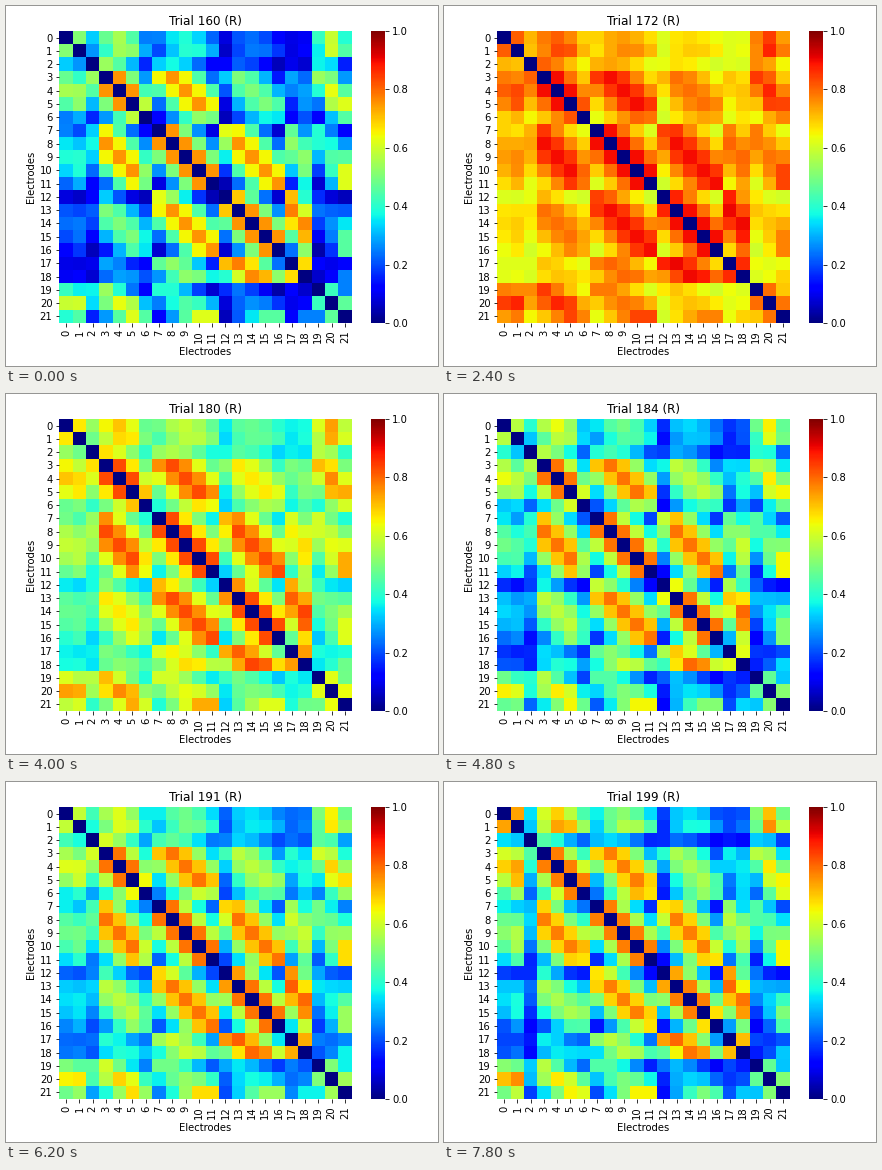
A matplotlib script that plays this animation: 432x360 px, repeating every 8 s.

```python
import numpy as np
import matplotlib.pyplot as plt
from matplotlib.animation import FuncAnimation

N = 22
W, H = 432, 360
FIRST, TRIALS, STEP = 160, 40, 200


def row(y, half):
    return [(x, y) for x in range(-half, half + 1)]


# Scalp positions, one unit between neighbouring electrodes
POS = np.array([(-.1, 1.6), (.4, 1.5), (-1, 1.7)] + row(1, 1) + [(1.3, .7)]
               + row(0, 2) + [(-2.1, -1.5)] + row(-1, 2)[1:]
               + [(-1, -1.9), (.3, -1.9), (-1.5, 1.5), (.2, 1.6), (1.5, .5)])
DIST = np.hypot(*(POS[:, None] - POS).T)

FRONT = [0, 1, 19, 20, 21]
QUALITY = np.ones(N)
QUALITY[[0, 1, 2, 6, 19]] = .65
QUALITY[[20, 21]] = .75

# trial: (spread, falloff, gains of electrodes that stand out)
STATES = {
    0: (1, .25, {}),
    7: (.98, .25, {0: .85}),
    12: (.42, .25, {1: 1.1, 19: 1.2, 20: 1.1}),
    16: (.48, .25, {19: 1.2, 20: 1.1}),
    24: (.96, .22, {0: 1.1, 12: .85, 17: .85}),
    31: (.85, .25, {}),
    39: (.93, .24, {0: 1.2, 1: 1.3, 2: .75, 6: 1.3, 16: .85}),
}


def blend(k, values):
    return np.interp(k, list(STATES), values)


def matrix(k):
    spread, falloff = (blend(k, [s[i] for s in STATES.values()])
                       for i in range(2))
    q = [QUALITY[e] * blend(k, [s[2].get(e, 1) for s in STATES.values()])
         for e in range(N)]
    # Falls off linearly with distance, softened near zero
    link = np.logaddexp(0, 8 * (1 - falloff * DIST)) / 8 * np.outer(q, q)
    link[np.ix_(FRONT, FRONT)] += .14
    m = 1 - spread * (1 - link)
    np.fill_diagonal(m, 0)
    return np.clip(m, 0, 1)


def box(x, y, w, h):
    return [x / W, 1 - (y + h) / H, w / W, h / H]


fig = plt.figure(figsize=(W / 72, H / 72), dpi=72, facecolor="white")
ax = fig.add_axes(box(53.46, 24.9, 292.1, 292.1))
cax = fig.add_axes(box(365, 24.9, 14.3, 292.1))

mesh = ax.pcolormesh(matrix(0), cmap="jet", vmin=0, vmax=1)
ax.invert_yaxis()
ticks = np.arange(N) + .5
ax.set_xticks(ticks, range(N), rotation=90)
ax.set_yticks(ticks, range(N))
ax.set_xlabel("Electrodes")
ax.set_ylabel("Electrodes")
title = ax.set_title("")
ax.spines[:].set_visible(False)

bar = fig.colorbar(mesh, cax=cax, ticks=np.linspace(0, 1, 6))
bar.outline.set_linewidth(0)


def update(k):
    mesh.set_array(matrix(k))
    title.set_text(f"Trial {FIRST + k} (R)")
    return mesh, title


anim = FuncAnimation(fig, update, frames=TRIALS, interval=STEP,
                     repeat=True, repeat_delay=0)
plt.show()
```
